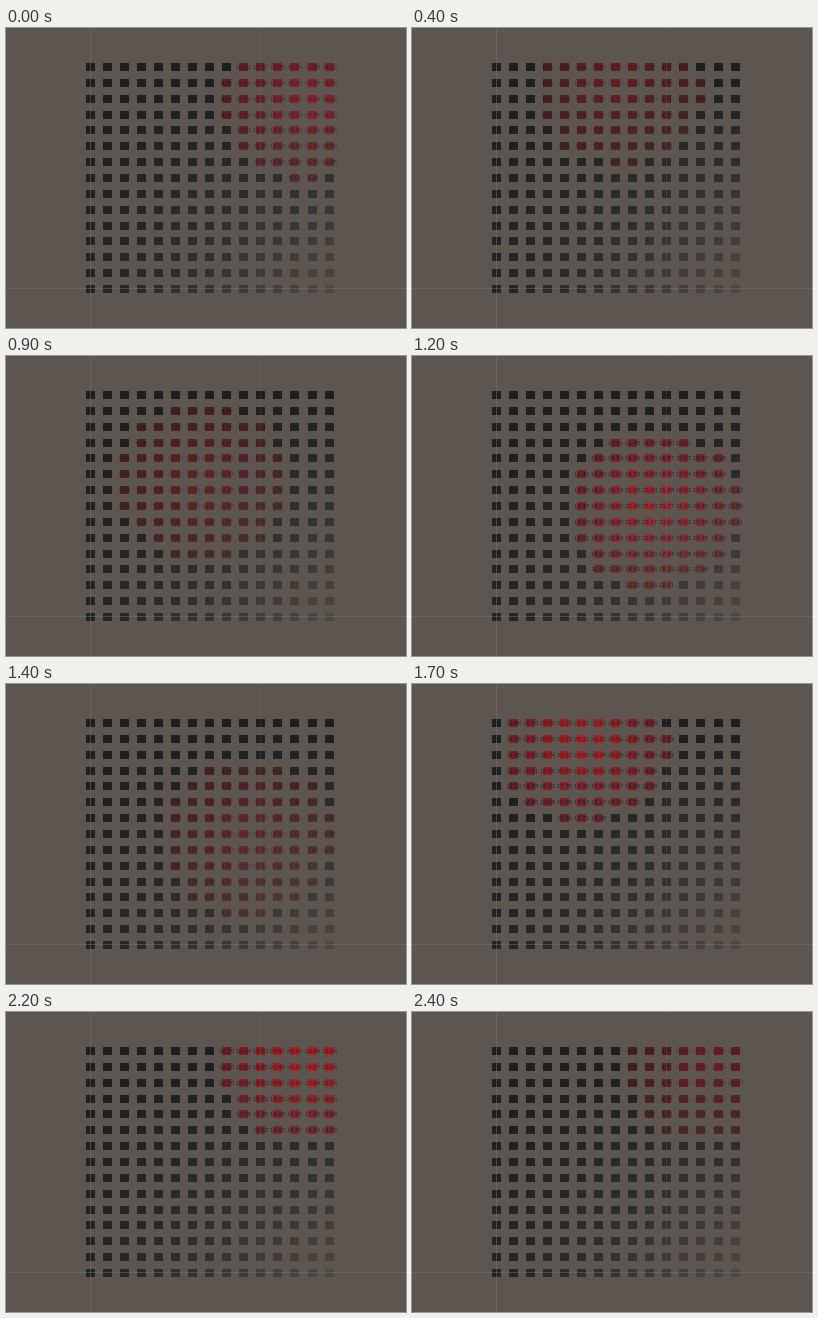
Write an HTML page with a canvas that moves like this. It is 400 by 300 pixels and loops after 2500 ms.

```html
<!DOCTYPE html>
<html lang="en">
<head>
<meta charset="utf-8">
<title>Heat grid</title>
<style>
  html, body { margin: 0; width: 100%; height: 100%; overflow: hidden; background: #5d5650; }
  canvas { display: block; width: 400px; height: 300px; }
</style>
</head>
<body>
<canvas id="stage" width="400" height="300"></canvas>
<script>
const ctx = document.getElementById('stage').getContext('2d');
const LOOP = 2500, STEP = 100, FADE = 400;
const COUNT = 15, RADIUS = 5;
const BG = [93, 86, 80], DARK = [28, 31, 34], RED = [186, 28, 36];

// Pulse centres are in grid cells.
const pulses = [
  { start: -100, col: 12.65, row: 2.15 },
  { start: 200, col: 7.1, row: 1.1 },
  { start: 700, col: 6.6, row: 5.4 },
  { start: 1200, col: 9.25, row: 7.25 },
  { start: 1700, col: 5.1, row: 1.3 },
  { start: 2200, col: 12.6, row: 1 }
];

const mix = (a, b, k) => a.map((v, i) => v + (b[i] - v) * k);
const rgb = c => `rgb(${c.map(Math.round).join(',')})`;

// Tiles melt into the background towards the bottom right.
function melt(col, row) {
  const u = col / (COUNT - 1), v = row / (COUNT - 1);
  return 0.08 * v + 0.66 * Math.pow(u * v, 1.15);
}

function heatAt(col, row, time) {
  let heat = 0, fade = 0;
  for (const p of pulses) {
    const age = time - p.start;
    const dist = Math.hypot(col - p.col, row - p.row);
    if (age < 0 || age >= FADE || dist >= RADIUS) continue;
    const level = 1 - age / FADE;
    const value = level * (1 - dist / 9.2);
    if (value > heat) { heat = value; fade = level; }
  }
  return { heat, fade };
}

function drawCell(col, row, time) {
  const x = Math.round(80 + col * 17.04);
  const y = Math.round(35 + row * 15.86);
  const { heat, fade } = heatAt(col, row, time);
  ctx.fillStyle = rgb(mix(mix(DARK, RED, heat), BG, melt(col, row)));
  ctx.fillRect(x, y, 9, 8);
  if (!heat) return;
  ctx.fillStyle = `rgba(24,18,19,${0.72 * fade})`;
  ctx.fillText((26 * heat).toFixed(2), x + 4.5, y + 4);
}

function drawLines() {
  ctx.fillStyle = 'rgba(112,120,124,.45)';
  ctx.fillRect(84, 0, 1, 300);
  ctx.fillRect(0, 260, 400, 1);
  ctx.fillStyle = 'rgba(112,120,124,.2)';
  ctx.fillRect(254, 0, 1, 260);
}

function draw(now) {
  const time = Math.floor((now % LOOP) / STEP) * STEP;
  ctx.fillStyle = rgb(BG);
  ctx.fillRect(0, 0, 400, 300);
  ctx.font = '6px "Liberation Sans", Arial, sans-serif';
  ctx.textAlign = 'center';
  ctx.textBaseline = 'middle';
  for (let row = 0; row < COUNT; row++) {
    for (let col = 0; col < COUNT; col++) drawCell(col, row, time);
  }
  drawLines();
}

const begin = performance.now();
function tick() {
  draw(performance.now() - begin);
  requestAnimationFrame(tick);
}
tick();
</script>
</body>
</html>
```
